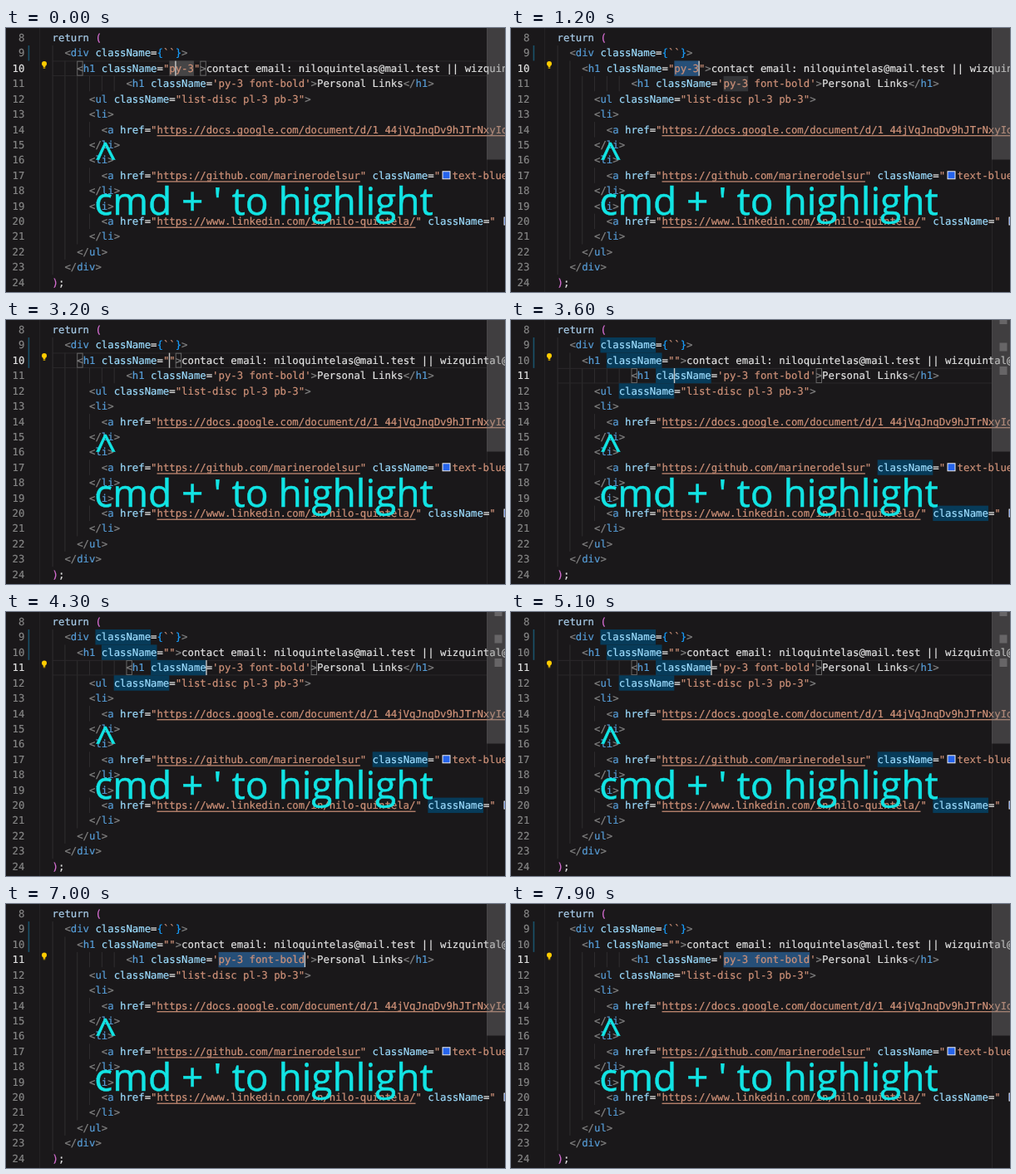
An HTML page for the animation above (8 s loop, 600 by 318 pixels).

```html
<!DOCTYPE html>
<html lang="en">
<head>
<meta charset="utf-8">
<title>Highlight between quotes</title>
<style>
html, body { margin: 0; width: 100%; height: 100%; overflow: hidden; background: #1a181a; }
svg { display: block; width: 600px; height: 318px; }
text { white-space: pre; text-rendering: geometricPrecision; }
text, tspan { fill: currentColor; stroke: currentColor; }
.code { font: 12.3px "DejaVu Sans Mono", monospace; font-variant-ligatures: none; stroke-width: .2px; }
.title { font: 46px "Open Sans", "Noto Sans", sans-serif; color: #12e4e4; stroke-width: .5px; }
</style>
</head>
<body>
<svg id="stage" viewBox="0 0 600 318"></svg>
<script>
const stage = document.getElementById("stage");
const LOOP = 8000, CHAR = 7.405, LEFT = 55.6, ROW = 18.42, FIRST = 8;

const lines = [
  "return (",
  "  <div className={``}>",
  "",
  "            <h1 className='py-3 font-bold'>Personal Links</h1>",
  '      <ul className="list-disc pl-3 pb-3">',
  "      <li>",
  '        <a href="https://docs.google.com/document/d/1_44jVqJnqDv9hJTrNxyId0',
  "      </li>",
  "      <li>",
  '        <a href="https://github.com/marinerodelsur" className="',
  "      </li>",
  "      <li>",
  '        <a href="https://www.linkedin.com/in/nilo-quintela/" className="',
  "      </li>",
  "    </ul>",
  "  </div>",
  ");"
];
const heading = cls =>
  `    <h1 className="${cls}">contact email: niloquintelas@mail.test || wizquintal@mail.test`;

const colX = col => LEFT + col * CHAR;
const midY = n => 11.8 + (n - FIRST) * ROW;
const esc = s => s.replace(/&/g, "&amp;").replace(/</g, "&lt;");
const rect = (x, y, w, h, fill, extra = "") =>
  `<rect x="${x}" y="${y}" width="${w}" height="${h}" fill="${fill}" ${extra}/>`;
const label = (x, n, body, color = "#e2e2e2", extra = "") =>
  `<text class="code" x="${x}" y="${midY(n) + 4.2}" color="${color}" ${extra}>${body}</text>`;
const mark = (n, col, len, fill) => rect(colX(col), midY(n) - 9.2, len * CHAR, ROW, fill);
const bracket = (n, col) => rect(colX(col) + .5, midY(n) - 8.5, CHAR - 1, 17, "none", 'stroke="#666"');

// Syntax colouring
const TOKEN = /(<\/?)(\w+)|(>)|(\w+)(?==)|(["'`][^"'`]*["'`]?)|([{}])|([()])|(return)|\s+|[^\s<>="'`{}()]+|=/g;
const tint = (s, color) => `<tspan color="${color}">${esc(s)}</tspan>`;
const paint = s => s.replace(TOKEN, (all, open, tag, close, attr, str, brace, paren, key) =>
  tag ? tint(open, "#808080") + tint(tag, "#569cd6") :
  close ? tint(all, "#808080") :
  attr ? tint(all, "#9cdcfe") :
  str ? tint(all, "#ce9178") :
  brace ? tint(all, "#179fff") :
  paren ? tint(all, "#da70d6") :
  key ? tint(all, "#a9cdea") : esc(all));

function underline(s, n) {
  const url = s.match(/https[^"]*/);
  return url ? rect(colX(url.index), midY(n) + 6.8, url[0].length * CHAR, 1.2, "#ce9178") : "";
}

const swatch = (x, n) => rect(x, midY(n) - 4.8, 9, 9, "#2563eb", 'stroke="#eee"');

function bulb(n) {
  const y = midY(n) - 5.6;
  return `<circle cx="46" cy="${y}" r="3" fill="#ffcc00"/>` +
    rect(44.7, y + 2, 2.6, 2.4, "#ffcc00") + rect(44.7, y + 4.8, 2.6, 1, "#c9a000");
}

// Editing steps: start time, caret line and column
const steps = [
  [0, 10, 20], [1000, 10, 23], [2900, 10, 19], [3300, 11, 19],
  [4100, 11, 25], [5300, 11, 31], [7000, 11, 41]
];

// Indent guides: column, first and last line
const guides = [
  [0, 9, 23], [2, 10, 22], [4, 11, 21], [6, 11, 11], [8, 11, 11], [10, 11, 11],
  [6, 14, 14], [6, 17, 17], [6, 20, 20]
];

function draw(t) {
  const [start, row, col] = steps.filter(s => s[0] <= t).pop();
  const cut = t >= 2900;
  const names = t >= 3500 && t < 5300;
  const selected = t >= 7000 || t >= 1000 && !cut;
  const text = lines.slice();
  text[2] = heading(cut ? "" : "py-3");
  let out = rect(0, 0, 600, 318, "#1a181a");

  for (const [c, from, to] of guides)
    out += rect(colX(c), midY(from) - 9.2, 1, (to - from + 1) * ROW, "#302e30");
  out += rect(40, 0, 1, 318, "#242224") + rect(578, 0, 1, 318, "#282628");
  out += rect(26.6, midY(9) - 9.2, 1.6, cut ? 2 * ROW : ROW, "#1a536b");
  if (!selected) for (const edge of [-9.2, 8.4])
    out += rect(LEFT, midY(row) + edge, 578 - LEFT, 1, "#2a282a");

  // Word highlights and selections
  if (t < 1000) out += mark(10, 19, 4, "#464546");
  else if (!cut) out += mark(10, 19, 4, "#264f78") + mark(11, 27, 4, "#343538");
  if (names) text.forEach((s, i) => {
    const at = s.indexOf("className");
    if (at >= 0) out += mark(i + FIRST, at, 9, "#073b59");
  });
  if (t >= 7000) out += mark(11, 27, 14, "#264f78");
  else if (t >= 5500) out += mark(11, 27, 14, "#464546");
  if (!selected)
    out += row === 10 ? bracket(10, 4) + bracket(10, cut ? 20 : 24) : bracket(11, 12) + bracket(11, 42);

  text.forEach((s, i) => {
    const n = i + FIRST;
    out += label(22.4, n, n, n === row ? "#e0e0e0" : "#858585", 'text-anchor="end"');
    out += label(LEFT, n, paint(s)) + underline(s, n);
  });
  out += swatch(525, 17) + label(536.6, 17, "text-blue-600", "#ce9178") + swatch(599, 20);
  out += bulb(t < 3700 ? 10 : 11);
  if ((t - start) % 1000 < 500) out += rect(colX(col) - .5, midY(row) - 9, 1.4, 18, "#c8c8c8");

  // Scrollbar
  out += rect(578, 0, 22, 158.5, "#797979", 'opacity=".4"');
  if (names) for (const [y, h] of [[0, 5], [27.5, 10], [56, 10]])
    out += rect(587.5, y, 9, h, "#a0a0a0", 'opacity=".4"');

  return out + '<text class="title" x="107.5" y="171">^</text>' +
    `<text class="title" x="106.3" y="225.2">cmd + ' to highlight</text>`;
}

let shown = "";
function tick() {
  const next = draw(performance.now() % LOOP);
  if (next !== shown) stage.innerHTML = shown = next;
  requestAnimationFrame(tick);
}
tick();
</script>
</body>
</html>
```
